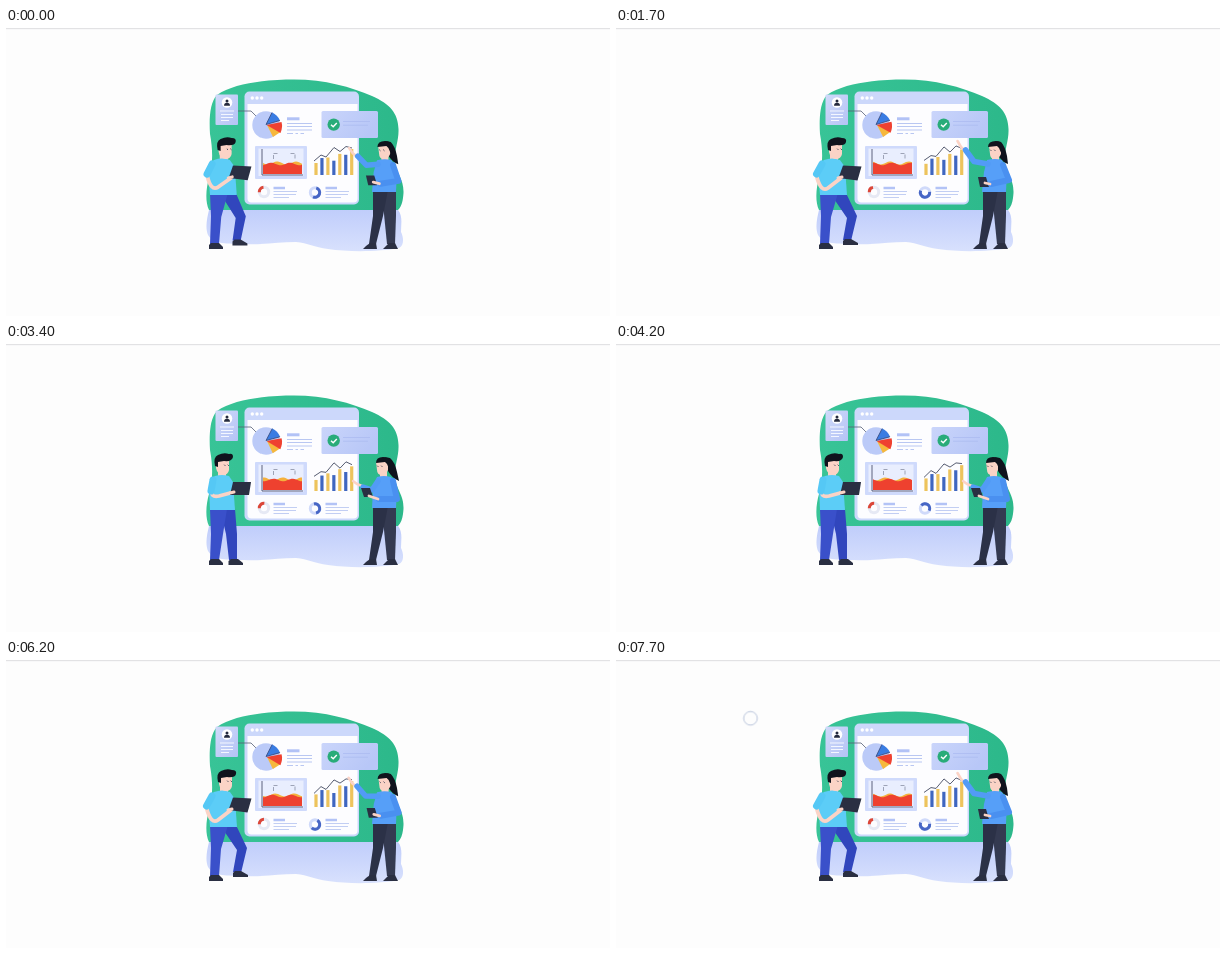
Recreate the animation shown at these times as an HTML page. Size 604 px wide and 288 px high, loop 7800 ms.

```html
<!DOCTYPE html>
<html lang="en">
<head>
<meta charset="utf-8">
<title>Dashboard team</title>
<style>
  html, body { margin: 0; width: 100%; height: 100%; overflow: hidden; background: #fdfdfd; }
  svg { display: block; width: 604px; height: 288px; }
  .cursor { animation: glide 7.8s infinite; }
  @keyframes glide {
    0%, 84.5% { transform: translate(14px, 52px); opacity: 0; animation-timing-function: step-end; }
    84.6% { transform: translate(14px, 52px); opacity: 1; animation-timing-function: ease-out; }
    91.5%, 100% { transform: translate(134.5px, 58.3px); opacity: 1; }
  }
</style>
</head>
<body>
<svg viewBox="0 0 604 288" fill="none">
  <defs>
    <linearGradient id="blob"><stop stop-color="#38c497"/><stop offset="1" stop-color="#2cb88a"/></linearGradient>
    <linearGradient id="floor" x2="0" y2="1"><stop stop-color="#c0cdfb"/><stop offset="1" stop-color="#d8e1fd"/></linearGradient>
    <linearGradient id="card" x2="1" y2=".4"><stop stop-color="#cad5fb"/><stop offset="1" stop-color="#b8c7f7"/></linearGradient>
    <linearGradient id="badge" x2="1" y2="1"><stop stop-color="#d0dafa"/><stop offset="1" stop-color="#b4c3f5"/></linearGradient>
  </defs>
  <rect width="604" height="1.2" fill="#e2e2e4"/>

  <path fill="url(#blob)" d="M203 182C199 174 200 160 203 150C207 137 207 122 204 106C203 90 204 74 211 67C228 55 262 51.500 288 51.500C319 51.500 345 59 366 68C384 76 392 85 392.500 101C393 113 388 122 389 134C390 145 398 151 397.500 165C397 172 396 178 392 182Z"/>
  <path fill="url(#floor)" d="M203 182H392C397 188 395 196 395 204C398 210 398 218 393 220C372 224 342 224 322 221C308 219 302 215 290 214C272 214 258 217 238 216C222 216 207 216 202 207C199 200 201 190 203 182Z"/>

  <rect x="238.500" y="63.500" width="114.500" height="113" rx="5" fill="#ccd8fb"/>
  <path fill="#fdfdff" d="M241.500 76H351.500V170.500Q351.500 174.500 347.500 174.500H245.500Q241.500 174.500 241.500 170.500Z"/>
  <g fill="#fff"><circle cx="246.300" cy="70" r="1.700"/><circle cx="251" cy="70" r="1.700"/><circle cx="255.700" cy="70" r="1.700"/></g>

  <rect x="209.500" y="66.500" width="22.500" height="30.500" rx="1" fill="url(#badge)"/>
  <circle cx="221" cy="74.500" r="5.300" fill="#fff"/>
  <circle cx="221" cy="73" r="1.500" fill="#252a3e"/>
  <path fill="#252a3e" d="M218 77.700Q218 74.800 221 74.800Q224 74.800 224 77.700Z"/>
  <path stroke="#f4f7ff" d="M214 83H228M215 86.500H227M215 89.500H227M215 92.500H223"/>
  <path stroke="#555d75" stroke-width=".8" d="M232 83H245L254 92"/>

  <circle cx="260" cy="97" r="13.700" fill="#bbcaf8"/>
  <g id="pie">
    <path fill="#f6b83c" d="M261 97L274.500 104L267 109Z"/>
    <path fill="#ef4130" d="M260.500 97L275.500 94Q277 99 274.500 105Z"/>
    <path fill="#3a7ce2" d="M260 96.500L266 84.500Q271.500 87 274 92.500Z"/>
    <path stroke="#354778" stroke-width=".8" d="M260 96.500L266 84.500M260 96.500L274 92.500"/>
  </g>
  <path stroke="#b2c2f6" stroke-width="3" d="M281 90.800H293.500"/>
  <path stroke="#b9c7f2" d="M281 95.500H306M281 98.500H306M281 102H306M281 105.500H287M289.500 105.500H292M294.500 105.500H298"/>

  <rect x="315.500" y="83" width="56.500" height="27" rx="1.500" fill="url(#card)"/>
  <circle cx="327.700" cy="96.600" r="6.200" fill="#28ac79"/>
  <path stroke="#fff" stroke-width="1.400" d="M325 96.700L327.200 98.800L330.800 95"/>
  <path stroke="#acbcf1" stroke-width=".8" d="M337 93.500H364M337 97.200H362"/>

  <rect x="249" y="118" width="52" height="33" rx="1" fill="#cfdafc"/>
  <rect x="252.500" y="120.500" width="45" height="27.500" fill="#e9eefe"/>
  <path id="back" fill="#f5b13d"/>
  <path id="front" fill="#ee412f"/>
  <path stroke="#4c5270" stroke-width=".9" d="M256 121V147H297"/>
  <path stroke="#7d8398" stroke-width=".7" d="M267.500 131V125.500H272M284.500 125.500H289V131" stroke-dasharray="4 1.500"/>

  <g id="bars"></g>
  <path id="trend" stroke="#454b61" stroke-width=".9"/>

  <g stroke-width="3">
    <circle cx="258" cy="164" r="4.700" stroke="#e6e9f4"/>
    <path id="ringA" stroke="#dc4638"/>
    <circle cx="309" cy="164.500" r="4.700" stroke="#d0dafa"/>
    <path id="ringB" stroke="#4766c5"/>
  </g>
  <path stroke="#b3c3f6" stroke-width="2.500" d="M267.500 160H279M319.500 160H331"/>
  <path stroke="#bcc9f2" stroke-width=".9" d="M267.500 163.500H291M267.500 166.500H290M267.500 169.500H283M319.500 163.500H343M319.500 166.500H342M319.500 169.500H335"/>

  <g id="man"></g>
  <g id="woman"></g>

  <circle class="cursor" r="6.800" stroke="#aab8d4" stroke-width=".8"/>
</svg>
<script>
const LOOP = 7800, CYCLE = 6000, TAU = Math.PI * 2;
const $ = id => document.getElementById(id);

function add(parent, attrs) {
  const el = document.createElementNS('http://www.w3.org/2000/svg', 'path');
  for (const key in attrs) el.setAttribute(key, attrs[key]);
  parent.append(el);
  return el;
}

const SKIN = '#fbd3c6', INK = '#2a2f42', HAIR = '#10131d';

// Each part: colour, resting path, active path, optional stroke width.
// Both paths of a part use the same commands, so their numbers can be blended.
const man = [
  ['#3146bd', 'M214 165L229 165L231 190L231 216L223 216L220 190Z', 'M214 165L230 165L241 188L235 213L227 212L231 190Z'],
  ['#3a50ca', 'M204 165L221 165L217 190L213 216L204 216L205 190Z', 'M204 165L222 165L215 189L213 216L204 216L205 188Z'],
  [INK, 'M203 221L203 217L205 215L213 215L217 219L217 221Z', 'M203 221L203 217L205 215L213 215L217 219L217 221Z'],
  [INK, 'M222.5 221L222.5 217L225 215L232 215L237 219L237 221Z', 'M227 217L227 213L229 211L235 211L242 215L242 217Z'],
  [SKIN, 'M212 125L220 125L220 134L212 134Z', 'M214 125L222 125L222 134L214 134Z'],
  ['#5ccdf7', 'M209 132Q216 130 223 132L227 138L229 166L204 166L203 142Q203 135 209 132Z', 'M208 132Q216 129 224 132L229 139L231 167L204 167L202 144Q202 135 208 132Z'],
  [SKIN, 'M206 145Q204 154 213 152L228 148', 'M200.5 148Q205 165 212 160L225 150', 3.8],
  ['#55c8f5', 'M207 136L205 147', 'M206 136L200.5 146', 7],
  [INK, 'M227 138L245 138L243 151L224 151Z', 'M227 137.5L245.5 138.5L241.5 152.5L222.5 150Z'],
  [SKIN, 'M224 149L228 148', 'M222 150L226 149', 3],
  [SKIN, 'M210 117L223 117L223 126Q222 131 217 131Q211 130 210 124Z', 'M213 117L226 117L226 126Q225 131 220 131Q214 130 213 124Z'],
  [HAIR, 'M209 122Q207 113 212 111Q218 108 223 110Q227 109 227 113Q226 118 218 117L212 118L212 123Z', 'M212 122Q210 113 215 111Q221 108 226 110Q231 110 230 114Q229 118 221 117L215 118L215 123Z'],
  ['#30374b', 'M218.5 121L219 121.5M222 121L222.5 121.5', 'M221.5 121L222 121.5M225 121L225.5 121.5', 1]
];

const woman = [
  [HAIR, 'M374 115Q378 112 384 114Q389 118 391 128L393 137Q386 134 382 127Z', 'M376 115Q381 112 385 114Q389 118 391 128L392 136Q386 134 382 127Z'],
  ['#343a51', 'M376 162L390 162L390 188L389 216L381 216L378 186Z', 'M376 162L390 162L390 188L389 216L381 216L378 186Z'],
  ['#2b3147', 'M367 162L382 162L377 188L370 216L363 216L367 188Z', 'M367 162L382 162L377 188L370 216L363 216L367 188Z'],
  [INK, 'M357 221L360 218L364 215L370 215L371 221Z', 'M357 221L360 218L364 215L370 215L371 221Z'],
  [INK, 'M377 221L380 218L383 215L389 215L392 221Z', 'M377 221L380 218L383 215L389 215L392 221Z'],
  [SKIN, 'M374 125L381 125L381 135L374 135Z', 'M376 125L383 125L383 135L376 135Z'],
  ['#569ff8', 'M371 133Q378 131 385 133L391 143L390 164L366 164L367 144Z', 'M371 132Q379 130 386 132L391 142L390 164L366 164L368 144Z'],
  [SKIN, 'M356 142L351 140L347 137', 'M350 124L345 119L341.5 113', 2.6],
  ['#529bf6', 'M372 137L366 146L357 143', 'M372 136L358 133.5L349.5 122', 5.5],
  [INK, 'M355 144L364 144L367 153L358 153Z', 'M362 149L370 149L373 159L364 159Z'],
  ['#4a90f0', 'M387 137L391 155L373 155', 'M387 137L393 152L375 156', 6],
  [SKIN, 'M372 155L363 152', 'M374 156L369 155', 2.8],
  [SKIN, 'M370 118L382 118L382 126Q380 131 376 131Q371 131 371 126Z', 'M373 118L385 118L385 126Q383 131 379 131Q374 131 374 126Z'],
  [HAIR, 'M370 119Q370 113 377 113Q384 113 385 119L385 126Q382 124 381 120L379 118Z', 'M372 119Q372 113 380 113Q386 113 387 119L387 126Q384 124 383 120L381 118Z'],
  ['#30374b', 'M371.5 122L372 122.5M375.5 122L376 122.5', 'M374.5 122L375 122.5M378.5 122L379 122.5', 1]
];

function build(id, parts) {
  return parts.map(([color, rest, active, width]) => {
    const look = width
      ? { stroke: color, 'stroke-width': width, 'stroke-linecap': 'round', 'stroke-linejoin': 'round' }
      : { fill: color };
    return { el: add($(id), look), rest, active };
  });
}

const NUM = /-?\d+(\.\d+)?/g;
function mix(a, b, p) {
  const to = b.match(NUM);
  let i = 0;
  return a.replace(NUM, n => (+n + (to[i++] - n) * p).toFixed(2));
}

const manParts = build('man', man), womanParts = build('woman', woman);
const pose = (parts, p) => parts.forEach(({ el, rest, active }) => el.setAttribute('d', mix(rest, active, p)));

const heights = [12, 16, 17, 15, 22, 20, 25];
const bars = heights.map((h, i) => add($('bars'), { stroke: i % 2 ? '#3f66c0' : '#edc35c', 'stroke-width': 3.2 }));

const clamp = v => Math.max(0, Math.min(1, v));
const ease = v => { v = clamp(v); return v * v * (3 - 2 * v); };
const ramp = (t, from, to) => ease((t - from) / (to - from));

function wave(y, amp, phase) {
  let d = 'M257 146';
  for (let x = 257; x <= 296; x += 1.5) {
    d += `L${x} ${(y + amp * Math.sin((x - 257) / 3 + phase)).toFixed(2)}`;
  }
  return d + 'L296 146Z';
}

function arc(cx, cy, start, sweep) {
  const at = a => `${cx + 4.7 * Math.cos(a)} ${cy + 4.7 * Math.sin(a)}`;
  return `M${at(start)}A4.7 4.7 0 ${sweep > Math.PI ? 1 : 0} 1 ${at(start + sweep)}`;
}

function draw(ms) {
  const t = ms % CYCLE, turn = t / CYCLE * TAU;
  // The active pose spans the end of one cycle and the start of the next.
  const late = t < 3000 ? t + CYCLE : t;
  const drop = 1 - ramp(late, 7800, 8550);
  const rise = ramp(late, 5450, 6150);
  pose(manParts, rise * drop);
  pose(womanParts, (0.8 * rise + 0.2 * ramp(late, 6200, 7000)) * drop);

  $('back').setAttribute('d', wave(135, 1.5, turn * 3));
  $('front').setAttribute('d', wave(136, 1.3, 2 - turn * 2));

  bars.forEach((bar, i) => {
    const x = 310 + i * 5.95;
    const h = heights[i] + Math.sin(turn * 3 + i * 1.3);
    bar.setAttribute('d', `M${x} 147V${147 - h}`);
  });
  const bob = 0.7 * Math.sin(turn * 3);
  $('trend').setAttribute('d', `M308 ${133 + bob}L315 ${127 - bob}L320 ${129 + bob}L328 ${119.5 + bob}L334 ${123.5 - bob}L340 ${118.5 + bob}L346 ${120 - bob}`);

  $('pie').setAttribute('transform', `rotate(${(1.5 * Math.sin(turn * 2)).toFixed(2)} 260 97)`);
  $('ringA').setAttribute('d', arc(258, 164, 3.1, 1.5 + 0.25 * Math.sin(turn * 2)));
  $('ringB').setAttribute('d', arc(309, 164.5, -1.3 + 1.2 * Math.sin(turn), 3.3 + 0.4 * Math.sin(turn)));
}

let start;
function tick(now) {
  start ??= now;
  draw((now - start) % LOOP);
  requestAnimationFrame(tick);
}
draw(0);
requestAnimationFrame(tick);
</script>
</body>
</html>
```
